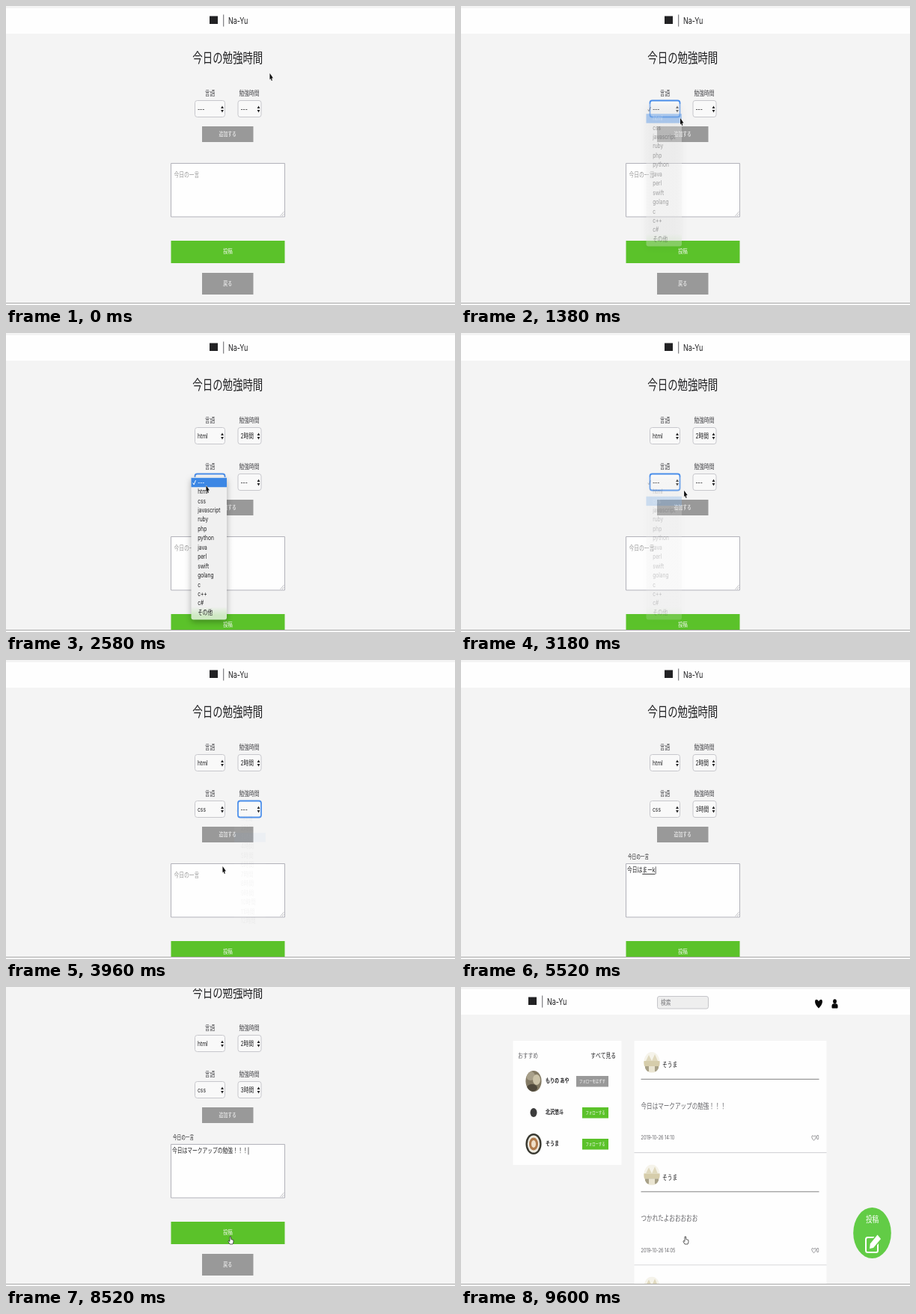
An HTML page with a canvas for the animation above (9720 ms loop, 600 px wide and 400 px high).

```html
<!DOCTYPE html>
<html lang="ja">
<head>
<meta charset="utf-8">
<title>勉強時間</title>
<style>
html, body { margin: 0; width: 100%; height: 100%; overflow: hidden; background: #f4f4f4; }
canvas { display: block; width: 600px; height: 400px; }
</style>
</head>
<body>
<canvas id="stage" width="600" height="400"></canvas>
<script>
const ctx = document.getElementById('stage').getContext('2d');
const LOOP = 9720, SQUEEZE = 0.75, ROW = 12.45, FADE = 230;
const ADD_ROW = 2280, FOCUS_NOTE = 4260, SCROLL = 7960, FEED = 8640;
const FONT = 'Inter, "Noto Sans CJK JP", "Noto Sans CJK", sans-serif';
const C = { page: '#f4f4f4', card: '#fefefe', green: '#5bc22a', gray: '#999999', ink: '#222224', soft: '#66666a' };
const BRAND = 'Na-Yu', POSTER = 'そうま';

const LANGS = ['---', 'html', 'css', 'javascript', 'ruby', 'php', 'python', 'java', 'perl',
  'swift', 'golang', 'c', 'c++', 'c#', 'その他'];
const HOURS = ['---', ...Array.from({ length: 12 }, (_, i) => i + 1 + '時間')];
const LANG_BOX = { x: 252, w: 41, items: LANGS, menuW: 47.5 };
const HOUR_BOX = { x: 309.5, w: 32, items: HOURS, menuW: 42 };

// Each pick: which select, when its menu opens, when an item is chosen
const PICKS = [
  { box: LANG_BOX, row: 0, open: 840, pick: 1240, item: 1 },
  { box: HOUR_BOX, row: 0, open: 1560, pick: 1840, item: 2 },
  { box: LANG_BOX, row: 1, open: 2460, pick: 3000, item: 2 },
  { box: HOUR_BOX, row: 1, open: 3360, pick: 3740, item: 3 }
];

// [time, x, y]
const POINTER = [
  [0, 352.5, 90], [240, 352, 92], [720, 272, 138], [1020, 272, 140], [1200, 270, 150],
  [1260, 270, 150], [1380, 293, 150], [1500, 325, 138], [1620, 325, 140], [1800, 322, 163],
  [1900, 322, 163], [2100, 297, 170], [2300, 297, 172], [2440, 268, 200], [2580, 267.5, 204],
  [2880, 266, 225], [3060, 266, 225], [3280, 322, 200], [3440, 322, 201], [3680, 320, 238],
  [3760, 320, 238], [3960, 289.5, 276], [4140, 285, 284], [7860, 286, 284], [8040, 300, 334],
  [LOOP, 300, 334]
];

// [time, committed text, text being composed]
const TYPED = [[FOCUS_NOTE, '', '']];
function compose(done, steps) {
  for (const [t, s] of steps) TYPED.push([t, done, s]);
}
compose('', [[4500, 'k'], [4620, 'ky'], [4680, 'きょ'], [4800, 'きょう'], [4920, 'きょうh'],
  [4980, 'きょうは'], [5160, '今日は']]);
compose('今日は', [[5280, ''], [5340, 'm'], [5400, 'ま'], [5460, 'まー'], [5520, 'まーk'], [5580, 'まーく'],
  [5700, 'まーくあ'], [5820, 'まーくあp'], [5880, 'まーくあっp'], [5940, 'まーくあっぷ'],
  [6060, 'まーくあっぷn'], [6120, 'まーくあっぷの'], [6300, 'マークアップの']]);
compose('今日はマークアップの', [[6420, ''], [6480, 'b'], [6540, 'べ'], [6660, 'べn'], [6720, 'べんk'],
  [6840, 'べんky'], [6900, 'べんきょ'], [6960, 'べんきょう'], [7080, '勉強']]);
compose('今日はマークアップの勉強', [[7320, ''], [7500, '！'], [7620, '！！'], [7740, '！！！']]);
compose('今日はマークアップの勉強！！！', [[7860, '']]);

const clamp = v => Math.max(0, Math.min(1, v));
const ease = v => { v = clamp(v); return v * v * (3 - 2 * v); };
const mix = (a, b, p) => a + (b - a) * p;

function rect(x, y, w, h, fill) {
  ctx.fillStyle = fill;
  ctx.fillRect(x, y, w, h);
}
function box(x, y, w, h, r, fill, stroke, line = 1) {
  ctx.beginPath();
  ctx.roundRect(x, y, w, h, r);
  if (fill) { ctx.fillStyle = fill; ctx.fill(); }
  if (stroke) { ctx.strokeStyle = stroke; ctx.lineWidth = line; ctx.stroke(); }
}
function oval(x, y, rx, ry, fill) {
  ctx.beginPath();
  ctx.ellipse(x, y, rx, ry, 0, 0, 7);
  ctx.fillStyle = fill;
  ctx.fill();
}
function poly(points, fill) {
  ctx.beginPath();
  points.forEach(([x, y]) => ctx.lineTo(x, y));
  ctx.closePath();
  ctx.fillStyle = fill;
  ctx.fill();
}
// The whole page is narrowed by the same factor, text included
function squeezed(x, y, draw) {
  ctx.save();
  ctx.translate(x, y);
  ctx.scale(SQUEEZE, 1);
  draw();
  ctx.restore();
}
function text(s, x, y, size, color = C.ink, align = 'left', weight = 400) {
  squeezed(x, y, () => {
    ctx.font = `${weight} ${size}px ${FONT}`;
    ctx.textAlign = align;
    ctx.textBaseline = 'middle';
    ctx.fillStyle = color;
    ctx.fillText(s, 0, 0);
  });
}
function textWidth(s, size) {
  ctx.font = `400 ${size}px ${FONT}`;
  return ctx.measureText(s).width * SQUEEZE;
}
function button(s, x, y, w, h, size, fill) {
  rect(x, y, w, h, fill);
  text(s, x + w / 2, y + h / 2, size, '#fbfbfb', 'center');
}
function heart(x, y, size, fill) {
  squeezed(x, y, () => {
    const r = size;
    ctx.beginPath();
    ctx.moveTo(0, r * 0.9);
    ctx.bezierCurveTo(-r * 1.7, -r * 0.2, -r * 0.9, -r * 1.5, 0, -r * 0.5);
    ctx.bezierCurveTo(r * 0.9, -r * 1.5, r * 1.7, -r * 0.2, 0, r * 0.9);
    if (fill) { ctx.fillStyle = fill; ctx.fill(); }
    else { ctx.strokeStyle = C.soft; ctx.lineWidth = 0.8; ctx.stroke(); }
  });
}

function header(x) {
  rect(0, 3, 600, 34, C.card);
  rect(x, 13.5, 11, 10.5, C.ink);
  rect(x + 18.3, 11.5, 0.9, 16, '#55555a');
  text(BRAND, x + 25, 20.5, 12, C.ink);
}

function chosen(select, row, t) {
  const p = PICKS.find(p => p.box === select && p.row === row);
  const blur = Math.min(...[...PICKS.map(q => q.open), ADD_ROW, FOCUS_NOTE].filter(time => time > p.open));
  return { value: t >= p.pick + FADE ? select.items[p.item] : '---', focused: t >= p.open && t < blur };
}
function selectBox(select, row, t) {
  const { x, w } = select, y = 126 + row * 62, { value, focused } = chosen(select, row, t);
  box(x + 0.5, y + 0.5, w - 1, 22, 3, '#f9f9f9', focused ? '#4a8eea' : '#c2c2c8', focused ? 1.8 : 0.9);
  text(value, x + 4, y + 12, 9);
  const ax = x + w - 4, ay = y + 12;
  poly([[ax - 1.9, ay - 1], [ax, ay - 4.4], [ax + 1.9, ay - 1]], C.ink);
  poly([[ax - 1.9, ay + 1], [ax, ay + 4.4], [ax + 1.9, ay + 1]], C.ink);
}

function note(t, dy) {
  const y = 210 + dy;
  box(220.5, y + 0.5, 152, 71.5, 0, '#fefefe', '#b2b2ba', 1);
  ctx.strokeStyle = '#a0a0a4';
  ctx.lineWidth = 0.6;
  ctx.beginPath();
  for (const d of [2.5, 5]) { ctx.moveTo(371.5 - d, y + 71); ctx.lineTo(371.5, y + 71 - d * 1.2); }
  ctx.stroke();

  const p = ease((t - FOCUS_NOTE) / 200);
  text('今日の一言', mix(224.5, 223, p), y + mix(16, -8, p), mix(9, 7.5, p), p > 0.5 ? C.ink : '#9c9c9c');
  if (t < FOCUS_NOTE) return;
  const [, done, live] = TYPED.findLast(k => t >= k[0]);
  const ty = y + 9.3, x0 = 222 + textWidth(done, 9), x1 = x0 + textWidth(live, 9);
  text(done + live, 222, ty, 9);
  if (live) rect(x0, ty + 4.6, x1 - x0, 0.9, C.ink);
  if (live || (t - FOCUS_NOTE) % 1000 < 500) rect(x1 + 0.3, ty - 5, 0.8, 10, '#444448');
}

function form(t) {
  const rows = t >= ADD_ROW ? 2 : 1, dy = (rows - 1) * 62;
  header(272);
  text('今日の勉強時間', 296.3, 71, 17.9, C.ink, 'center');
  for (let r = 0; r < rows; r++) {
    text('言語', 272.5, 117 + r * 62, 9, '#444448', 'center');
    text('勉強時間', 325, 117 + r * 62, 9, '#444448', 'center');
    selectBox(LANG_BOX, r, t);
    selectBox(HOUR_BOX, r, t);
  }
  button('追加する', 262, 161 + dy, 68.5, 21, 7.8, C.gray);
  note(t, dy);
  button('投稿', 220.5, 314 + dy, 152, 30, 8.3, C.green);
  button('戻る', 262, 357 + dy, 68.5, 29, 8, C.gray);
}

function menu(p, t, pos) {
  const fade = 1 - clamp((t - p.pick) / FADE);
  if (t < p.open || !fade) return;
  const { items, menuW: w } = p.box, x = p.box.x - 4.5, cy = 138 + p.row * 62;
  const top = cy - ROW / 2, y = top - 1, h = items.length * ROW + 4;
  const hover = Math.floor((pos.y - top) / ROW);
  const active = t >= p.pick ? p.item : Math.max(0, Math.min(items.length - 1, hover));
  ctx.save();
  ctx.globalAlpha = fade;
  let fill = '#f0f0f0';
  if (p.box === LANG_BOX) {
    fill = ctx.createLinearGradient(0, y, 0, y + h);
    fill.addColorStop(0, '#f0f0f0');
    fill.addColorStop(0.91, '#f0f0f0');
    fill.addColorStop(0.97, '#cfe9c4');
    fill.addColorStop(1, '#cfe9c4');
  }
  // The soft shadow thins out faster than the panel
  ctx.shadowColor = `rgba(0,0,0,${0.3 * fade})`;
  ctx.shadowBlur = 8;
  ctx.shadowOffsetY = 3;
  box(x, y, w, h, 3, fill);
  ctx.shadowColor = 'transparent';
  rect(x, top + active * ROW, w, ROW, '#3c87e4');
  items.forEach((s, i) => text(s, x + 8.7, cy + i * ROW, 8.8, i === active ? '#fff' : C.ink));
  ctx.strokeStyle = active === 0 ? '#fff' : C.ink;
  ctx.lineWidth = 1;
  ctx.beginPath();
  ctx.moveTo(x + 2.2, cy + 0.5);
  ctx.lineTo(x + 3.6, cy + 2.8);
  ctx.lineTo(x + 6, cy - 3);
  ctx.stroke();
  ctx.restore();
}

function photo(x, y, paint) {
  ctx.save();
  ctx.beginPath();
  ctx.ellipse(x, y, 10.6, 14, 0, 0, 7);
  ctx.clip();
  paint();
  ctx.restore();
}
function post(y, body, time) {
  rect(231.5, y, 257, 149, C.card);
  rect(231.5, y + 149, 257, 1, '#d4d4d8');
  photo(255, y + 29, () => {
    rect(243, y + 15, 24, 28, '#f5f3ea');
    rect(243, y + 27, 24, 7, '#d6cdab');
    poly([[247, y + 27], [251, y + 19], [255, y + 27]], '#e0d9be');
    poly([[255, y + 27], [259, y + 18], [263, y + 27]], '#e0d9be');
    rect(246, y + 34, 18, 7, '#a8a188');
    rect(251, y + 34, 8, 8, '#eae5d2');
  });
  text(POSTER, 269, y + 32.3, 9, C.ink, 'left', 500);
  rect(240.5, y + 50.8, 238, 1.1, '#8c8c8c');
  text(body, 240.5, y + 87.5, 10.1, C.soft);
  text('2019-10-26 ' + time, 240.5, y + 130, 7.4, C.soft);
  heart(471.5, y + 130, 3.6);
  text('0', 478.5, y + 130, 8, C.soft, 'right');
}
function person(y, name, label, following) {
  text(name, 113, y, 8, C.ink, 'left', 700);
  const w = following ? 43 : 35;
  button(label, 197 - w, y - 7, w, 14.5, 5.8, following ? C.gray : C.green);
}
function feed() {
  header(90);
  box(262.5, 12.5, 68, 16.5, 2.5, '#eeeeee', '#c0c0c4', 0.9);
  text('検索', 267, 21, 9, '#77777a');
  heart(478, 22.5, 6.6, '#080808');
  oval(499.5, 19.2, 2.4, 3, '#080808');
  box(495.5, 22.2, 8, 6.4, [3, 3, 1, 1], '#080808');

  rect(69.5, 72, 145, 166, C.card);
  text('おすすめ', 76, 92, 9, C.soft);
  text('すべて見る', 207, 92, 9, C.ink, 'right', 500);
  photo(97, 126, () => {
    rect(86, 111, 22, 30, '#837a64');
    oval(93, 119, 6, 6, '#a8a08a');
    oval(101, 124, 5, 7, '#cbc3a8');
    oval(95, 135, 7, 5, '#4f493c');
  });
  oval(97, 168, 4.5, 6, '#3c3c3c');
  photo(97, 210, () => {
    rect(86, 195, 22, 30, '#383830');
    oval(97, 210, 8.2, 11.5, '#eeeae0');
    oval(97, 210, 6, 8.5, '#b07b4c');
    oval(97, 210, 3, 5, '#f0dfc8');
  });
  person(126, 'もりの あや', 'フォローをはずす', true);
  person(168, '北沢悠斗', 'フォローする');
  person(210, POSTER, 'フォローする');

  post(72, '今日はマークアップの勉強！！！', '14:10');
  post(222.5, 'つかれたよおおおおお', '14:05');
  post(372.5, '', '13:58');

  oval(549.5, 329, 25.3, 34, '#62cc46');
  text('投稿', 549.5, 312, 11.5, '#fff', 'center');
  ctx.strokeStyle = '#fff';
  ctx.lineWidth = 2;
  ctx.lineJoin = 'round';
  box(541, 335, 16, 20, 2.5, null, '#fff', 2);
  poly([[546, 350], [546.8, 343.5], [556.5, 331.5], [561, 337], [551, 349]], '#62cc46');
  ctx.lineWidth = 3;
  ctx.strokeStyle = '#62cc46';
  ctx.stroke();
  poly([[546, 350], [546.8, 343.5], [556.5, 331.5], [561, 337], [551, 349]], '#fff');
}

function pointerAt(t) {
  const i = POINTER.findLastIndex(k => t >= k[0]);
  const a = POINTER[i], b = POINTER[i + 1] || a;
  const p = ease((t - a[0]) / (b[0] - a[0] || 1));
  return { x: mix(a[1], b[1], p), y: mix(a[2], b[2], p) };
}
function pointer(t, { x, y }) {
  if (t > 4400 && t < 7860) return;
  const hand = t > 8010 || (t > 2060 && t < 2330);
  ctx.save();
  ctx.translate(x, y);
  ctx.strokeStyle = hand ? '#333' : '#fff';
  ctx.lineWidth = 0.8;
  ctx.lineJoin = 'round';
  const shape = hand
    ? [[-1, 0], [0.6, 0], [0.8, 3.6], [3.8, 4.4], [4, 7], [3, 10], [-1, 10], [-3, 6.5], [-2.6, 5.4], [-1, 6.4]]
    : [[0, 0], [0, 8.4], [1.3, 7], [2.3, 10], [3.3, 9.5], [2.4, 6.5], [4.4, 6.4]];
  poly(shape, hand ? '#fff' : '#111');
  ctx.stroke();
  if (!hand) poly(shape, '#111');
  ctx.restore();
}

function draw(t) {
  rect(0, 0, 600, 400, C.page);
  ctx.save();
  ctx.beginPath();
  ctx.rect(0, 2, 600, 395);
  ctx.clip();
  const pos = pointerAt(t);
  if (t >= FEED) feed();
  else {
    ctx.translate(0, -62 * ease((t - SCROLL) / 200));
    form(t);
  }
  ctx.restore();
  rect(0, 397, 600, 1, '#a8a8a8');
  rect(0, 398, 600, 2, '#f8f8f8');
  PICKS.forEach(p => menu(p, t, pos));
  pointer(t, pos);
}

const start = performance.now();
function tick() {
  draw((performance.now() - start) % LOOP);
  requestAnimationFrame(tick);
}
tick();
</script>
</body>
</html>
```
